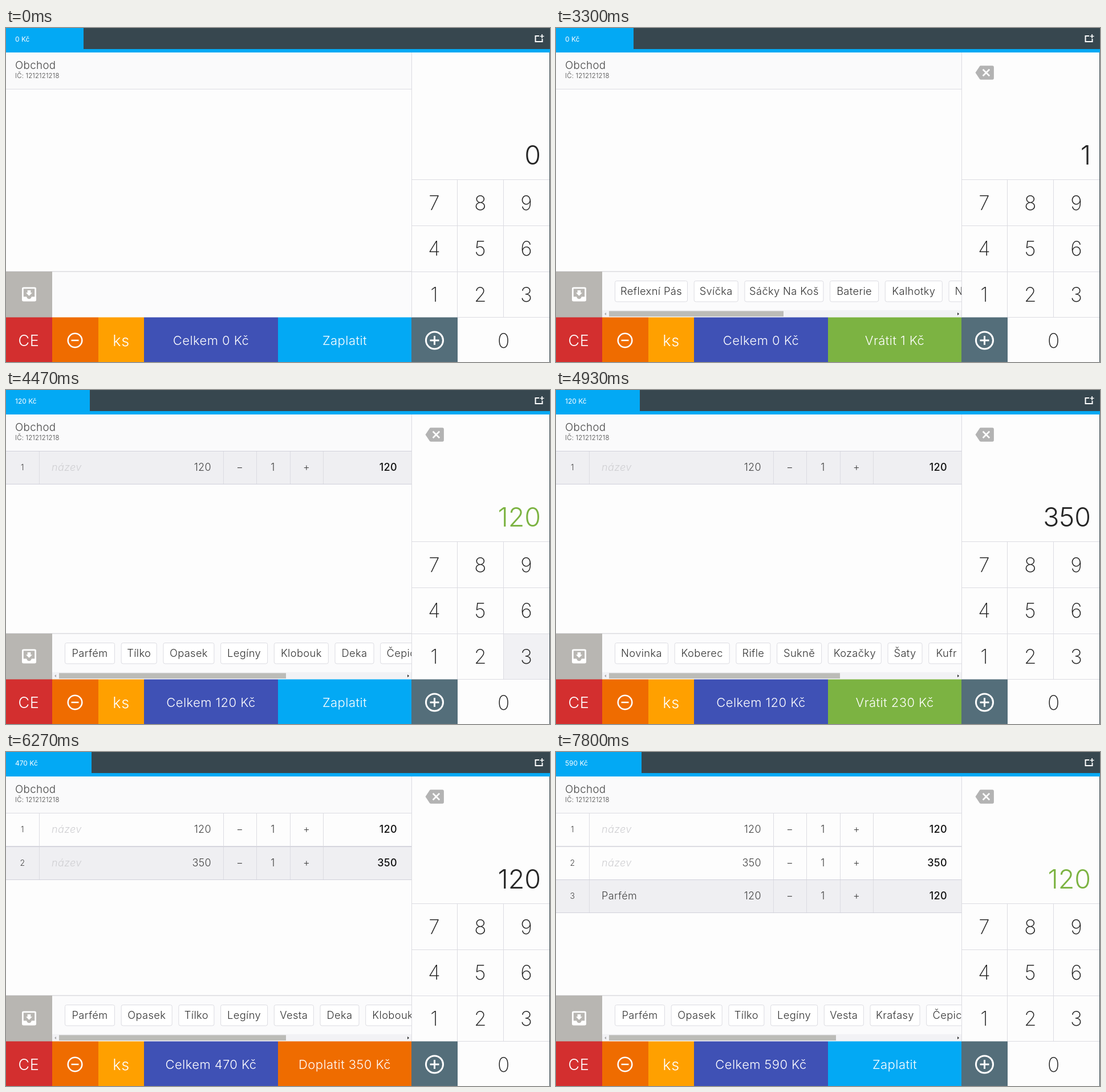
Write an HTML page that moves like this. It is 954 by 587 pixels and loops after 8000 ms.

```html
<!DOCTYPE html>
<html lang="cs">
<head>
<meta charset="utf-8">
<title>Pokladna</title>
<style>
html, body { margin: 0; width: 100%; height: 100%; overflow: hidden; background: #fdfdfd; }
svg { display: block; width: 954px; height: 587px; }
text { font-family: Inter, "Open Sans", sans-serif; font-weight: 300; letter-spacing: .02em; white-space: pre; }
.tab { font-weight: 400; letter-spacing: 0; }
.sum { font-weight: 450; }
.key { font-weight: 200; letter-spacing: 0; }
.display { font-weight: 350; letter-spacing: 0; }
</style>
</head>
<body>
<svg id="stage" viewBox="0 0 954 587"></svg>
<script>
const LOOP = 8000, PRESS = 100;
const BLUE = '#03a9f4', GREEN = '#7cb342', ORANGE = '#ef6c00', DARK = '#37474f', INK = '#262626', LINE = '#dcdce2';

// [time, key]: digits are typed, "+" adds a row, a name labels the newest row
const EVENTS = [
  [2900, '1'], [3450, '2'], [3700, '0'], [4200, '+'],
  [4530, '3'], [4670, '5'], [4830, '0'], [5170, '+'],
  [5400, '1'], [5650, '2'], [5900, '0'], [6400, '+'],
  [7500, 'Parfém']
];

const CHIP_WIDTH = {
  'Reflexní Pás': 128, 'Svíčka': 78, 'Sáčky Na Koš': 139, 'Baterie': 86, 'Kalhotky': 101,
  'Novinka': 94, 'Parfém': 88, 'Tílko': 63, 'Opasek': 90, 'Legíny': 83, 'Klobouk': 96,
  'Deka': 69, 'Čepice': 85, 'Vesta': 70, 'Kraťasy': 88, 'Koberec': 97, 'Rifle': 61,
  'Sukně': 79, 'Kozačky': 94, 'Šaty': 61, 'Kufr': 63
};

// suggestions for a price: right end of the scroll thumb, then names
function suggestions({ typed, rows }) {
  if (!typed) return null;
  if (typed === '350') return [498, 'Novinka', 'Koberec', 'Rifle', 'Sukně', 'Kozačky', 'Šaty', 'Kufr'];
  if (typed !== '120') return [399, 'Reflexní Pás', 'Svíčka', 'Sáčky Na Koš', 'Baterie', 'Kalhotky', 'Novinka'];
  if (rows.length < 2) return [491, 'Parfém', 'Tílko', 'Opasek', 'Legíny', 'Klobouk', 'Deka', 'Čepice'];
  const named = rows.some(r => r.name);
  return [491, 'Parfém', 'Opasek', 'Tílko', 'Legíny', 'Vesta', ...(named ? ['Kraťasy', 'Čepice'] : ['Deka', 'Klobouk'])];
}

function stateAt(time) {
  const s = { typed: '', added: false, rows: [], pressed: null };
  for (const [at, key] of EVENTS) {
    if (Math.abs(time - at) < PRESS && time < at + 40) s.pressed = key;
    if (time < at) break;
    if (key === '+') {
      s.rows.push({ price: +s.typed, name: '' });
      s.added = true;
    } else if (/\d/.test(key)) {
      s.typed = (s.added ? '' : s.typed) + key;
      s.added = false;
    } else {
      s.rows[s.rows.length - 1].name = key;
    }
  }
  s.total = s.rows.reduce((sum, r) => sum + r.price, 0);
  return s;
}

const rect = (x, y, w, h, fill, extra = '') =>
  `<rect x="${x}" y="${y}" width="${w}" height="${h}" fill="${fill}" ${extra}/>`;
const path = (d, stroke, width = 1) =>
  `<path d="${d}" fill="none" stroke="${stroke}" stroke-width="${width}"/>`;
const icon = (x, y, scale, fill, d) =>
  `<path transform="translate(${x} ${y}) scale(${scale})" fill="${fill}" d="${d}"/>`;
const text = (x, y, str, size, fill = INK, anchor = 'middle', extra = '') =>
  `<text x="${x}" y="${y}" font-size="${size}" fill="${fill}" text-anchor="${anchor}" ${extra}>${str}</text>`;

function topBar({ total, rows }) {
  const width = !rows.length ? 136 : total === 120 ? 147 : 150;
  return rect(0, 0, 954, 37, DARK) + rect(0, 37, 954, 6, BLUE) + rect(0, 0, width, 42, BLUE) +
    text(16, 23.5, total + ' Kč', 12, '#fff', 'start', 'class="tab"') +
    path('M935 14H928.5V24H940.5V19', '#fff', 2) + path('M936.5 14.5H943.5M940 11V18', '#fff', 1.7);
}

function receipt({ rows }) {
  let out = rect(0, 42, 711, 65, '#fafafb') +
    text(16, 72, 'Obchod', 18.7, '#444', 'start') + text(16, 88, 'IČ: 1212121218', 11.3, '#444', 'start') +
    path('M0 107.5H711', LINE);
  rows.forEach((row, i) => {
    const y = 107.5 + 58.5 * i, base = y + 34.5, active = i === rows.length - 1;
    const number = (x, str, anchor) => text(x, base, str, 18, '#444', anchor);
    if (active) out += rect(0, y, 711, 58.5, '#efeff2');
    out += path([58.5, 381.5, 439.5, 498.5, 556.5].map(x => `M${x} ${y}v58.5`).join(''), LINE) +
      path(`M0 ${Math.floor(y + 58) + .5}H711M0 ${Math.floor(y) + .5}H711`, active ? '#d0d0da' : LINE) +
      text(29, base - 1, i + 1, 14, '#444') +
      (row.name ? number(80, row.name, 'start') : text(80, base, 'název', 18, '#cfcfd2', 'start', 'font-style="italic"')) +
      number(360, row.price, 'end') + number(410, '−') + number(468, 1) + number(527, '+') +
      text(686, base, row.price, 18, '#111', 'end', 'class="sum"');
  });
  return out;
}

function chipStrip(s) {
  let out = rect(0, 428, 711, 80.5, '#fbfbfc');
  const list = suggestions(s);
  if (list) {
    const [thumbEnd, ...names] = list;
    let x = 103;
    for (const name of names) {
      const w = CHIP_WIDTH[name];
      out += rect(x + .5, 444.5, w - 1, 36.5, s.pressed === name ? '#efeff2' : '#fff', `rx="3" stroke="${LINE}"`) +
        text(x + w / 2, 468.5, name, 18.3, '#333');
      x += w + 10.7;
    }
    out += rect(81, 496, 630, 12, '#f2f2f5') + rect(93, 497.5, thumbEnd - 93, 9.5, '#bcbcb8') +
      icon(85, 500, 1, '#aaa', 'M3 0V5L0 2.5z') + icon(704, 500, 1, '#333', 'M0 0V5L3 2.5z');
  }
  return out + path('M0 428H711', '#cbcbd0') + rect(0, 428, 81, 81, '#b8b6b2') +
    icon(23.8, 451.3, 1.39, '#fff', 'M19 3H5a2 2 0 0 0-2 2v14a2 2 0 0 0 2 2h14a2 2 0 0 0 2-2V5a2 2 0 0 0-2-2zm0 12h-4a3 3 0 0 1-6 0H5V5h14zm-3-5h-2V7h-4v3H8l4 4z');
}

function payment({ typed, added, total }) {
  const change = typed - total;
  if (!typed || added || !change) return ['Zaplatit', BLUE];
  return change > 0 ? [`Vrátit ${change} Kč`, GREEN] : [`Doplatit ${-change} Kč`, ORANGE];
}

function keypad({ typed, added, pressed }) {
  let out = rect(711, 42, 243, 466.5, '#fdfdfd') + rect(792, 508.5, 162, 79, '#fdfdfd');
  const digit = (x, y, n) => text(x, y, n, 35, INK, 'middle', 'class="key"');
  if (pressed === '0') out += rect(792, 508.5, 161, 79, '#f1f1f4');
  for (let n = 1; n <= 9; n++) {
    const col = (n - 1) % 3, row = 2 - Math.floor((n - 1) / 3);
    if (pressed === String(n)) out += rect(711.5 + 80.7 * col, 266.5 + 80.8 * row, 80.7, 80.8, '#f1f1f4');
    out += digit(751 + 80.7 * col, 319.5 + 80.8 * row, n);
  }
  out += digit(872.5, 561.5, 0) +
    path('M711.5 42V508M791.5 266V508M872.5 266V508M711 266.5H954M711 347.5H954M711 428.5H954M792 508.5H954', LINE) +
    path('M953.5 42V587', DARK) +
    text(938, 240, typed || 0, 46.5, added ? GREEN : INK, 'end', 'class="display"');
  if (typed) out += icon(735.5, 62.3, 1.35, '#b3b3b3', 'M22 3H7c-.69 0-1.23.35-1.59.88L0 12l5.41 8.11c.36.53.9.89 1.59.89h15a2 2 0 0 0 2-2V5a2 2 0 0 0-2-2zm-3 12.59L17.59 17 14 13.41 10.41 17 9 15.59 12.59 12 9 8.41 10.41 7 14 10.59 17.59 7 19 8.41 15.41 12z');
  return out;
}

function actions(s) {
  const [label, color] = payment(s);
  const button = (x, end, fill) => rect(x, 508.5, end - x, 79, fill);
  const ring = (x, r, width, d) =>
    `<circle cx="${x}" cy="549" r="${r}" fill="none" stroke="#fff" stroke-width="${width}"/>` + path(d, '#fff', width);
  return button(0, 81, '#d32f2f') + button(81, 162, ORANGE) + button(162, 242, '#ffa000') +
    button(242, 477, '#3f51b5') + button(477, 711, color) +
    button(711, 792, s.pressed === '+' ? '#647d89' : '#546e7a') +
    text(40, 558.5, 'CE', 27, '#fff') + text(202, 558.5, 'ks', 27, '#fff') +
    text(359.5, 557, `Celkem ${s.total} Kč`, 22, '#fff') + text(594, 557, label, 22, '#fff') +
    ring(121, 12.3, 2.5, 'M114.5 549H127.5') + ring(751.5, 15, 3, 'M743.5 549H759.5M751.5 541V557');
}

const stage = document.getElementById('stage');
let shown = '';
function frame() {
  const s = stateAt(performance.now() % LOOP);
  const markup = receipt(s) + chipStrip(s) + keypad(s) + actions(s) + topBar(s);
  if (markup !== shown) stage.innerHTML = shown = markup;
  requestAnimationFrame(frame);
}
frame();
</script>
</body>
</html>
```
